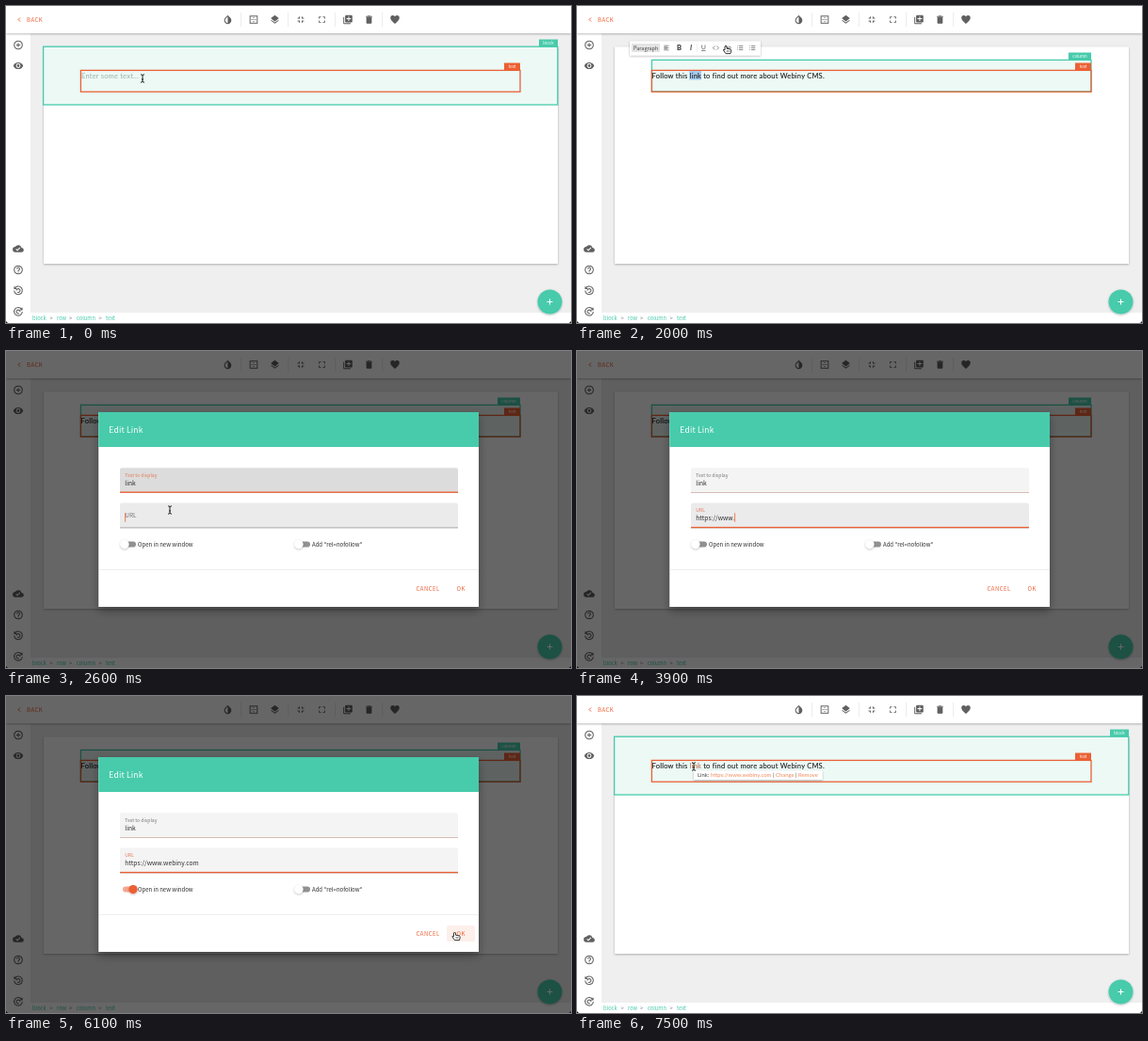
An HTML page that plays this animation: 600x337 px, repeating every 7600 ms.

```html
<!DOCTYPE html>
<html lang="en">
<head>
<meta charset="utf-8">
<title>Edit link</title>
<style>
  html, body { margin: 0; width: 100%; height: 100%; overflow: hidden; background: #efeff0; }
  svg { display: block; width: 100%; height: 100%; }
  text { font-family: "Noto Sans CJK JP", "Noto Sans CJK SC", "Open Sans", sans-serif; white-space: pre; }
  .lato { font-family: Lato, sans-serif; }
</style>
</head>
<body>
<svg id="stage" viewBox="0 0 600 337"></svg>
<script>
const LOOP = 7600, STEP = 100;
const TEAL = '#47cbab', ORANGE = '#ec6034', GREY = '#606060';
const URL_TEXT = 'https://www.webiny.com';

// 24-unit icon outlines
const ICONS = {
  drop: 'M17.7 7.9L12 2.3 6.3 7.9c-3.1 3.1-3.1 8.2 0 11.3a8 8 0 0 0 11.4 0c3.1-3.1 3.1-8.2 0-11.3zM12 19.6a6 6 0 0 1-4.2-10.2L12 5.1z',
  border: 'M3 3v18h18V3zm16 16H5V5h14zM11 7h2v2h-2zM11 11h2v2h-2zM15 11h2v2h-2zM11 15h2v2h-2zM7 11h2v2H7z',
  layers: 'M12 18.5l-7.4-5.7L3 14.1l9 7 9-7-1.6-1.3zM12 16l9-7-9-7-9 7z',
  shrink: 'M5 16h3v3h2v-5H5zM8 8H5v2h5V5H8zM14 19h2v-3h3v-2h-5zM16 8V5h-2v5h5V8z',
  expand: 'M7 14H5v5h5v-2H7zM5 10h2V7h3V5H5zM17 17h-3v2h5v-5h-2zM14 5v2h3v3h2V5z',
  copy: 'M4 6H2v14a2 2 0 0 0 2 2h14v-2H4zM20 2H8a2 2 0 0 0-2 2v12a2 2 0 0 0 2 2h12a2 2 0 0 0 2-2V4a2 2 0 0 0-2-2zm-1 9h-4v4h-2v-4H9V9h4V5h2v4h4z',
  bin: 'M6 19a2 2 0 0 0 2 2h8a2 2 0 0 0 2-2V7H6zM19 4h-3.5l-1-1h-5l-1 1H5v2h14z',
  heart: 'M12 21.3C5.4 15.4 2 12.3 2 8.5A5.4 5.4 0 0 1 12 5.1 5.4 5.4 0 0 1 22 8.5c0 3.8-3.4 6.9-10 12.8z',
  eye: 'M12 4.5A11.8 11.8 0 0 0 1 12a11.8 11.8 0 0 0 22 0A11.8 11.8 0 0 0 12 4.5zM12 17a5 5 0 1 1 0-10 5 5 0 0 1 0 10zm0-8a3 3 0 1 0 0 6 3 3 0 0 0 0-6z',
  cloud: 'M19.4 10A7.5 7.5 0 0 0 5.4 8 6 6 0 0 0 6 20h13a5 5 0 0 0 .4-10zM10 17l-3.5-3.5 1.4-1.4 2.1 2.1L15.2 9l1.4 1.4z'
};
const LINES = {
  plus: 'M12 7.5v9M7.5 12h9M3 12a9 9 0 1 0 18 0 9 9 0 1 0-18 0',
  help: 'M9 10a3 3 0 1 1 4.5 2.5Q12 13.5 12 15M12 16.3v1.7M3 12a9 9 0 1 0 18 0 9 9 0 1 0-18 0',
  undo: 'M4 7.5A9 9 0 1 1 3 12M3.5 3v5h5M8 12a4 4 0 1 1 2 3.5',
  redo: 'M20 7.5A9 9 0 1 0 21 12M20.5 3v5h-5M16 12a4 4 0 1 0-2 3.5',
  left: 'M3 4h18M3 8h12M3 12h18M3 16h12M3 20h18',
  underline: 'M7 3v8a5 5 0 0 0 10 0V3M5 21h14',
  code: 'M9 6l-6 6 6 6M15 6l6 6-6 6',
  link: 'M11 8H7a4 4 0 0 0 0 8h4M13 8h4a4 4 0 0 1 0 8h-4M8 12h8',
  list: 'M8 6h13M8 12h13M8 18h13M3 6h2M3 12h2M3 18h2'
};

const clamp = v => Math.max(0, Math.min(1, v));
const ramp = (t, from, to) => clamp((t - from) / (to - from));
const during = (t, from, to) => t >= from && t < to;

const rect = (x, y, w, h, fill, more = '') =>
  `<rect x="${x}" y="${y}" width="${w}" height="${h}" fill="${fill}" ${more}/>`;
const text = (x, y, size, fill, content, more = '') =>
  `<text x="${x}" y="${y}" font-size="${size}" fill="${fill}" ${more}>${content}</text>`;
const lato = (x, y, size, fill, content, more = '') =>
  text(x, y, size, fill, content, 'class="lato" ' + more);
const icon = (name, x, y, size = 11.5, color = GREY) => {
  const paint = ICONS[name] ? `fill="${color}" fill-rule="evenodd"` : `fill="none" stroke="${color}" stroke-width="2.2"`;
  return `<path transform="translate(${x - size / 2} ${y - size / 2}) scale(${size / 24})" d="${ICONS[name] || LINES[name]}" ${paint}/>`;
};
const caret = (x, y, color) => rect(x, y, .8, 9.5, color);
const outline = (x, y, w, h, color, fill = 'none') => rect(x, y, w, h, fill, `stroke="${color}" stroke-width="1.3"`);
const tag = (right, bottom, w, label, color) => rect(right - w, bottom - 7.5, w, 8, color) +
  text(right - w / 2, bottom - 2, 4.4, '#fff', label, 'text-anchor="middle"');

// Time, x, y, shape taken from that time on
const POINTER = [
  [0, 145, 77, 'beam'], [600, 145, 77, 'beam'], [1000, 132, 80, 'beam'], [1300, 121, 84, 'beam'],
  [1700, 121, 84, 'beam'], [1900, 149, 54, 'arrow'], [2000, 158, 42, 'hand'], [2100, 158, 40, 'arrow'],
  [2200, 158, 42, 'arrow'], [2500, 173, 160, 'beam'], [2600, 174, 169, 'beam'], [2800, 174, 169, 'none'],
  [4600, 174, 169, 'beam'], [4700, 172, 171, 'beam'], [4800, 165, 184, 'beam'], [4900, 155, 196, 'arrow'],
  [5000, 151, 199, 'arrow'], [5300, 130, 207, 'arrow'], [5500, 130, 207, 'arrow'], [6000, 474, 250, 'hand'],
  [6200, 479, 252, 'hand'], [6600, 479, 252, 'arrow'], [6900, 262, 122, 'arrow'], [7000, 170, 88, 'beam'],
  [7200, 124, 75, 'beam'], [LOOP, 124, 75, 'beam']
];
const SHAPES = {
  beam: '<path d="M-2-4.2Q0-4.2 0-3Q0-4.2 2-4.2M0-3V3M-2 4.2Q0 4.2 0 3Q0 4.2 2 4.2M-1 1h2" fill="none" stroke="#222"/>',
  arrow: '<path d="M0 0V7L1.7 5.5 2.9 8.2 4.2 7.6 3 5H5.2Z" fill="#111" stroke="#fff" stroke-width=".4"/>',
  hand: '<path d="M-1 1Q0-1 1 1V3.2L5 4Q6 4.2 5.6 6L5 8.6H0L-2.6 5Q-2.8 3.6-1 4.7Z" fill="#fff" stroke="#222" stroke-width=".9"/><path d="M1.6 5v2M3.3 5v2" stroke="#222" stroke-width=".6"/>',
  none: ''
};

function pointer(t) {
  const next = POINTER.findIndex(key => key[0] > t);
  const [t0, x0, y0, shape] = POINTER[next - 1], [t1, x1, y1] = POINTER[next];
  const p = ramp(t, t0, t1);
  return `<g transform="translate(${x0 + (x1 - x0) * p} ${y0 + (y1 - y0) * p})">${SHAPES[shape]}</g>`;
}

function chrome() {
  const top = { drop: 235.5, border: 263, layers: 285.5, shrink: 313, expand: 335.5, copy: 363, bin: 385.5, heart: 413 };
  const side = { plus: 41.5, eye: 63.5, cloud: 258, help: 280.5, undo: 302.5, redo: 325 };
  const crumbs = [[28, 'block'], [54, 'row'], [75, 'column'], [106, 'text']];
  return rect(0, 0, 26, 337, '#fff') + rect(0, 326, 600, 11, '#fff') +
    rect(0, 0, 600, 29, '#fff', 'filter="url(#shadow)"') +
    Object.entries(top).map(([name, x]) => icon(name, x, 14.5)).join('') +
    Object.entries(side).map(([name, y]) => icon(name, 13, y)).join('') +
    [249.5, 299.5, 349.5, 399.5].map(x => rect(x, 7, .6, 15, '#dedede')).join('') +
    `<path d="M15 12.5l-2 2 2 2" fill="none" stroke="${ORANGE}"/>` +
    text(22, 17, 6, ORANGE, 'BACK', 'letter-spacing=".5"') +
    crumbs.map(([x, name]) => text(x, 333.7, 5.7, TEAL, name)).join('') +
    [46.5, 67, 98.5].map(x => text(x, 333.7, 5.7, '#777', '&gt;')).join('') +
    `<circle cx="577.5" cy="314.5" r="13" fill="${TEAL}" filter="url(#shadow)"/>` +
    '<path d="M577.5 311.5v6M574.5 314.5h6" stroke="#fff" stroke-width="1.1"/>' +
    '<path d="M0 337v-2l2 2zM600 337v-2l-2 2z" fill="#222"/>';
}

function editor(t) {
  const blockHover = t < 1800 || t >= 6900;
  let out = rect(40, 43.5, 546, 230.5, '#fff', 'filter="url(#shadow)"');
  out += blockHover
    ? outline(39.6, 43.2, 546.2, 61.8, TEAL, '#ecf9f5') + tag(586, 43, 20, 'block', TEAL)
    : outline(79.4, 57.4, 466.6, 33.6, TEAL, '#ecf9f5') + tag(546, 57, 24, 'column', TEAL);
  out += outline(79.4, 68.4, 466.6, 22.8, ORANGE) + tag(546, 68, 17, 'text', ORANGE);

  if (t < 300) {
    out += lato(80, 77.3, 7.5, '#9bb0a8', 'Enter some text...', 'letter-spacing=".2"');
    return out + (t >= 100 ? caret(80, 69, '#222') : '');
  }
  const selected = t < 2100 ? ramp(t, 1000, 1300) * 12.7 : 0;
  out += rect(132 - selected, 69, selected, 9.5, '#a5cbee');
  const linkColor = t >= 6300 ? '#f08a5e' : '#1d1d1d';
  out += lato(79.6, 77.3, 7.5, '#1d1d1d',
    `Follow this <tspan fill="${linkColor}">link</tspan> to find out more about Webiny CMS.`,
    'letter-spacing=".22" stroke="#1d1d1d" stroke-width=".1"');
  if (t < 500 || during(t, 800, 1000)) out += caret(260.2, 69, '#222');
  if (during(t, 7200, 7500)) out += caret(123.2, 69, '#222');
  if (during(t, 1500, 2100)) out += formatBar();
  if (t >= 7200) out += linkHint();
  return out;
}

function formatBar() {
  return rect(56, 37.5, 139, 15, '#fff', 'filter="url(#shadow)"') + rect(58, 40, 30, 9, '#e4e4e4') +
    text(60, 46.8, 5.5, '#444', 'Paragraph') +
    icon('left', 95, 44.5, 7) + lato(106, 47.2, 7.5, '#444', 'B', 'font-weight="900"') +
    lato(120, 47.2, 7.5, '#444', 'I', 'font-weight="700" font-style="italic"') +
    rect(127.5, 40, .5, 9, '#ddd') +
    ['underline', 'code', 'link', 'list', 'list'].map((name, i) => icon(name, 134.3 + i * 13, 44.5, 8)).join('');
}

function linkHint() {
  return rect(124, 79.2, 136.5, 9.8, '#fff', 'filter="url(#shadow)"') +
    lato(128, 86, 5.9, '#444', 'Link:') + lato(142, 86, 5.9, '#f08a5e', URL_TEXT) +
    lato(208, 86, 5.9, '#555', '|') + lato(211, 86, 5.9, '#f08a5e', 'Change') +
    lato(232, 86, 5.9, '#555', '|') + lato(235, 86, 5.9, '#f08a5e', 'Remove');
}

function field(y, label, value, { float, focus, fill, line }) {
  const size = 6.45 - 1.35 * float;
  return `<path d="M121 ${y + 26.5}V${y + 2}q0-2 2-2H478q2 0 2 2v24.5z" fill="${fill}"/>` +
    rect(121, y + 26, 359, .7, line) +
    rect(300.5 - 179.5 * focus, y + 25.3, 359 * focus, 1.3, ORANGE) +
    text(126.3, y + 15.3 - 5.8 * float, size, focus && float ? '#e37a58' : '#777', label) +
    text(126.3, y + 18.6, 6.7, '#2b2b2b', value);
}

function toggle(x, label, on, ripple) {
  const knob = x + 2 + 9 * on;
  return rect(x, 202.4, 14, 6.2, on ? '#f4a78f' : '#919191', 'rx="3.1"') +
    (ripple ? `<circle cx="${knob}" cy="205.6" r="11" fill="${ORANGE}" opacity="${ripple}"/>` : '') +
    `<circle cx="${knob}" cy="205.6" r="4.6" fill="${on ? ORANGE : '#fff'}" filter="url(#shadow)"/>` +
    text(x + 16, 207.7, 6, '#2b2b2b', label);
}

function typedCount(t) {
  if (t < 3400) return Math.round(5 * ramp(t, 2800, 3300));
  if (t < 3700) return 6 + (t - 3400) / 50;
  return Math.round(10 + 12 * ramp(t, 3800, 4600));
}

function dialog(t) {
  const p = t < 2200 ? .615 : t < 2300 ? .97 : 1;
  const typed = URL_TEXT.slice(0, typedCount(t));
  const firstFocus = during(t, 2300, 2700);
  const urlFocus = ramp(t, 2600, 2800);
  const urlHover = during(t, 2600, 4900);
  const blink = t === 2600 || during(t, 2800, 3700) || during(t, 3900, 4800);
  // Measured advance keeps the caret at the end of the typed text
  pen.font = '6.7px "Noto Sans CJK JP", "Noto Sans CJK SC", "Open Sans", sans-serif';
  const caretX = 126.3 + pen.measureText(typed).width;
  const toggled = ramp(t, 5400, 5600);

  return rect(0, 0, 600, 337, '#000', `opacity="${.6 * p}"`) +
    `<g opacity="${p === .615 ? .66 : p}" transform="translate(300 ${168.5 + 68 * (1 - p)}) scale(${.8 + .2 * p}) translate(-300 -168.5)">` +
    rect(98.3, 65, 403.7, 207, '#fff', 'filter="url(#deep)"') + rect(98.3, 65, 403.7, 37, TEAL) +
    text(109.3, 86.8, 8.5, '#fff', 'Edit Link', 'font-weight="500" letter-spacing=".2"') +
    field(124.2, 'Text to display', 'link', {
      float: ramp(t, 2100, 2300), focus: +firstFocus,
      fill: firstFocus ? '#dcdcdc' : '#f4f4f4', line: t < 2300 ? '#999' : '#c7a598'
    }) +
    field(161.6, 'URL', typed, {
      float: ramp(t, 2600, 2800), focus: urlFocus,
      fill: urlHover ? '#ebebeb' : '#f4f4f4', line: '#888'
    }) +
    (blink ? caret(caretX, 172.3, ORANGE) : '') +
    toggle(124, 'Open in new window', toggled, during(t, 5500, 5800) ? .16 : 0) +
    toggle(309, 'Add "rel=nofollow"', 0, 0) +
    rect(98.3, 232, 403.7, .6, '#e3e3e3') +
    (t >= 6000 ? rect(468, 244, 30, 17, ORANGE, 'opacity=".1" rx="2"') : '') +
    text(435.5, 254.8, 6, ORANGE, 'CANCEL', 'font-weight="500" letter-spacing=".45"') +
    text(478.6, 254.8, 6, ORANGE, 'OK', 'font-weight="500" letter-spacing=".45"') + '</g>';
}

const DEFS = `<defs>
  <filter id="shadow" x="-20%" y="-20%" width="140%" height="150%"><feDropShadow dx="0" dy=".8" stdDeviation=".9" flood-opacity=".3"/></filter>
  <filter id="deep" x="-10%" y="-10%" width="120%" height="130%"><feDropShadow dx="0" dy="4" stdDeviation="5" flood-opacity=".35"/></filter>
</defs>`;
const pen = document.createElement('canvas').getContext('2d');
const stage = document.getElementById('stage');
let shown = -1;

function tick() {
  const t = Math.floor(performance.now() % LOOP / STEP) * STEP;
  if (t !== shown) {
    stage.innerHTML = DEFS + rect(0, 0, 600, 337, '#efeff0') + editor(t) + chrome() +
      (during(t, 2100, 6300) ? dialog(t) : '') + pointer(t);
    shown = t;
  }
  requestAnimationFrame(tick);
}
tick();
</script>
</body>
</html>
```
